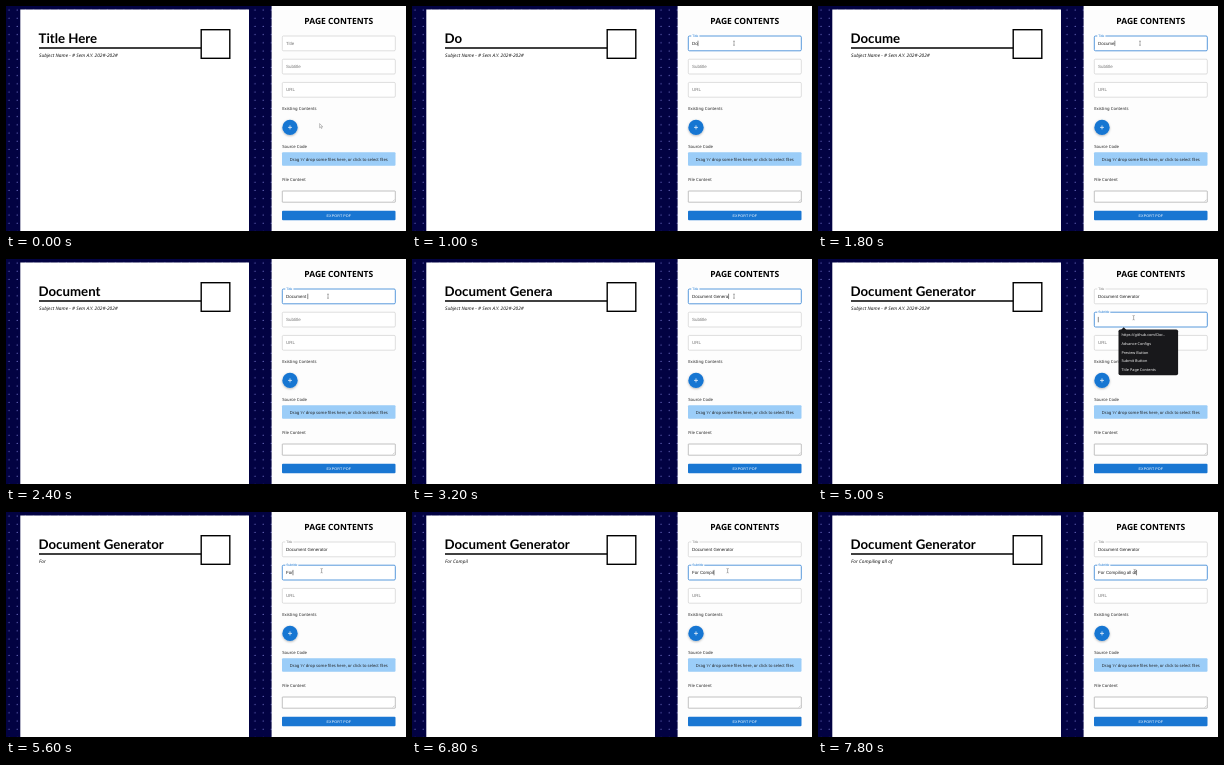
An HTML page that plays this animation: 400x225 px, repeating every 8000 ms.

```html
<!DOCTYPE html>
<html lang="en">
<head>
<meta charset="utf-8">
<title>Document form</title>
<style>
  html, body { margin: 0; width: 100%; height: 100%; overflow: hidden; background: #fff; }
  svg { display: block; width: 100vw; height: 100vh; }
  text { font: 4.22px "Noto Sans", sans-serif; fill: #222; white-space: pre; text-rendering: geometricPrecision; }
  .mid { text-anchor: middle; }
  #heading { font-size: 8.5px; font-weight: 600; fill: #000; }
  #docTitle { font: 700 13.25px Lato, sans-serif; fill: #000; }
  #docSubtitle { font-size: 4.72px; font-style: italic; letter-spacing: .02px; fill: #111; }
  #export { font: 3.7px "Liberation Sans", Arial, sans-serif; letter-spacing: .12px; fill: #fff; }
  .field text { font: 4.45px "Liberation Sans", Arial, sans-serif; }
  .field .label { fill: #777; }
  .field .small { font-size: 3.3px; }
  .field .box { fill: #fff; stroke: #c8c8c8; stroke-width: .6; }
  .field.hover .box { stroke: #666; }
  .field.focus .box { stroke: #2f80d4; stroke-width: .8; }
  .field.focus .label { fill: #1976d2; }
  #menu text { font-size: 3.8px; fill: #f2f2f2; }
</style>
</head>
<body>
<svg viewBox="0 0 400 225">
  <defs>
    <pattern id="dots" width="8.2" height="8.2" patternUnits="userSpaceOnUse">
      <circle cx="3" cy="4" r=".65" fill="#6a6ac0"/>
    </pattern>
    <filter id="shadow" x="-50%" y="-50%" width="200%" height="200%">
      <feDropShadow dx="0" dy=".8" stdDeviation=".9" flood-opacity=".3"/>
    </filter>
  </defs>

  <rect width="266" height="225" fill="#020242"/>
  <rect width="266" height="225" fill="url(#dots)"/>
  <rect x="14.3" y="3.5" width="228.7" height="222" fill="#fff"/>
  <text id="docTitle" x="32.5" y="37.4"></text>
  <path d="M33 42H195" stroke="#000" stroke-width="1.5"/>
  <rect x="195.2" y="23.7" width="28.6" height="28.6" fill="#fff" stroke="#000" stroke-width="1.4"/>
  <text id="docSubtitle" x="33" y="50.7"></text>

  <rect x="265.6" width="135" height="225" fill="#fdfdfd"/>
  <text id="heading" class="mid" x="332.8" y="18.2">PAGE CONTENTS</text>
  <g id="fields"></g>
  <text x="276.2" y="104">Existing Contents</text>
  <circle cx="284" cy="121.4" r="7.7" fill="#1976d2" filter="url(#shadow)"/>
  <path d="M282 121.4h4M284 119.4v4" stroke="#fff" stroke-width=".7"/>
  <text x="276.2" y="141.9">Source Code</text>
  <rect x="276" y="146.2" width="113.5" height="13.6" rx="1" fill="#9bcdf8"/>
  <text class="mid" x="332.8" y="154.5" style="font-size:4.15px">Drag 'n' drop some files here, or click to select files</text>
  <text x="276.2" y="175">File Content</text>
  <rect x="276.3" y="185" width="113" height="11.2" rx=".4" fill="#fff" stroke="#999" stroke-width=".6"/>
  <path d="M386.8 195.4l1.8-1.8" stroke="#888" stroke-width=".4"/>
  <rect x="276" y="204.7" width="113.5" height="9.5" rx="1" fill="#1976d2"/>
  <text id="export" class="mid" x="332.8" y="210.6">EXPORT PDF</text>

  <g id="menu">
    <path d="M303 71l2.7-2.7 2.7 2.7z" fill="#18181b"/>
    <rect x="300.5" y="70.4" width="59.6" height="45.8" rx="1.8" fill="#18181b"/>
  </g>
  <path id="arrow" d="M0 0v4.2l1-.9.8 1.6.7-.4-.7-1.5h1.3z" fill="#fff" stroke="#666" stroke-width=".4"/>
  <path id="beam" d="M-1-2.2q1 0 1 .6q0-.6 1-.6M0-1.6v3.2M-1 2.2q1 0 1-.6q0 .6 1 .6" fill="none" stroke="#555" stroke-width=".45"/>
</svg>
<script>
const $ = id => document.getElementById(id);
const LOOP = 8000, STEP = 200;
const TITLE = "Document Generator", SUBTITLE = "For Compiling all of";

// Characters typed after each step
const titleTyping = { start: 800, counts: [1, 2, 3, 4, 5, 6, 7, 8, 9, 10, 12, 13, 15, 17, 18] };
const subtitleTyping = { start: 5400, counts: [2, 3, 4, 5, 6, 6, 8, 10, 12, 14, 16, 18, 20] };

// Pointer stops: time, x, y
const pointer = [[0, 313.6, 117.6], [200, 319, 72], [400, 322, 37.2],
  [3800, 320, 44], [4000, 317, 53], [4200, 315.6, 58.7], [7600, 316.6, 59.6]];

$("fields").innerHTML = ["Title", "Subtitle", "URL"].map((name, i) => `
  <g class="field" transform="translate(276.3 ${30 + i * 23.2})">
    <rect class="box" width="113" height="14.8" rx="1.2"/>
    <rect class="notch" x="3" y="-1" height="2" fill="#fff"/>
    <text class="label">${name}</text>
    <text class="value" x="3.7" y="8.8"></text>
    <path class="caret" d="M0 4.7v5.4" stroke="#111" stroke-width=".5"/>
  </g>`).join("");

["https://github.com/Dor...", "Advance Configs", "Preview Button", "Submit Button", "Title Page Contents"]
  .forEach((item, i) => {
    const row = document.createElementNS("http://www.w3.org/2000/svg", "text");
    row.setAttribute("x", 303.4);
    row.setAttribute("y", 77 + i * 8.8);
    row.textContent = item;
    $("menu").append(row);
  });

const fields = [...document.querySelectorAll(".field")].map(root => {
  const part = name => root.querySelector("." + name);
  return { root, label: part("label"), notch: part("notch"), value: part("value"), caret: part("caret") };
});

const show = (el, on) => el.setAttribute("visibility", on ? "visible" : "hidden");

function typed(text, { start, counts }, t) {
  const i = Math.min(Math.floor((t - start) / STEP), counts.length - 1);
  return i < 0 ? "" : text.slice(0, counts[i]);
}

function drawField({ root, label, notch, value, caret }, text, focus, hover) {
  const small = focus || text !== "";
  root.classList.toggle("focus", focus);
  root.classList.toggle("hover", hover);
  label.classList.toggle("small", small);
  label.setAttribute("x", small ? 4 : 3.7);
  label.setAttribute("y", small ? 1 : 8.8);
  show(notch, small);
  notch.setAttribute("width", label.getComputedTextLength() + 2);
  value.textContent = text;
  show(caret, focus);
  const end = text ? value.getComputedTextLength() : 0;
  caret.setAttribute("transform", `translate(${4 + end} 0)`);
}

function draw(now) {
  const t = Math.floor(now % LOOP / STEP) * STEP;
  const title = typed(TITLE, titleTyping, t);
  const subtitle = typed(SUBTITLE, subtitleTyping, t);

  $("docTitle").textContent = title || "Title Here";
  $("docSubtitle").textContent = subtitle || "Subject Name - # Sem A.Y. 202#-202#";
  drawField(fields[0], title, t >= 400 && t < 4400, false);
  drawField(fields[1], subtitle, t >= 4400, t >= 4000 && t < 4400);
  drawField(fields[2], "", false, false);
  show($("menu"), t >= 4600 && t < 5400);

  const [, x, y] = pointer.findLast(stop => stop[0] <= t);
  for (const id of ["arrow", "beam"]) {
    $(id).setAttribute("transform", `translate(${x} ${y})`);
    show($(id), (id === "arrow") === t < 400);
  }
  requestAnimationFrame(draw);
}

requestAnimationFrame(draw);
</script>
</body>
</html>
```
